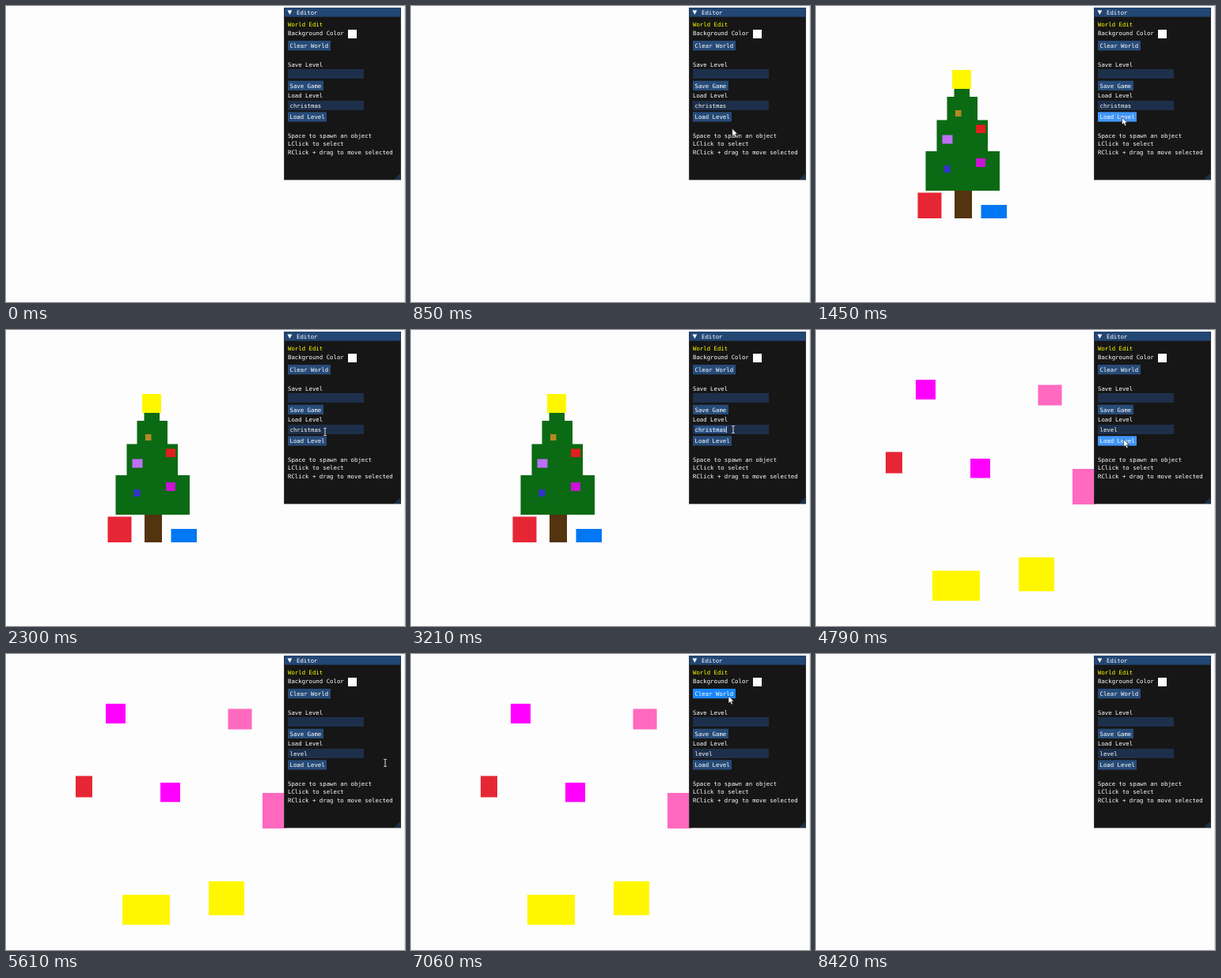
Write an HTML page with a canvas that moves like this. It is 504 by 375 pixels and loops after 8.55 s.

```html
<!DOCTYPE html>
<html lang="en">
<head>
<meta charset="utf-8">
<title>Level editor</title>
<style>
  html, body { margin: 0; width: 100%; height: 100%; overflow: hidden; background: #fdfdfd; }
  canvas { display: block; }
</style>
</head>
<body>
<canvas width="504" height="375"></canvas>
<script>
const ctx = document.querySelector('canvas').getContext('2d');
const LOOP = 8550, CHAR = 4.425;

// Boxes: left, top, right, bottom, colour
const tree = [
  [172, 81, 196, 105, '#fff700'],
  [174.5, 105, 194, 116, '#0b6a14'],
  [165.5, 115, 204, 146, '#0b6a14'],
  [152.5, 144.5, 217, 185, '#0b6a14'],
  [138.5, 184, 232, 234, '#0b6a14'],
  [175, 234, 197, 269, '#54330f'],
  [128.5, 236.5, 158.5, 269, '#e62635'],
  [208.5, 252, 241, 269, '#0077f3'],
  [176, 132, 183.5, 140, '#b38a22'],
  [202, 150.5, 214, 161, '#e21e1e'],
  [159.5, 163.5, 172.5, 174.5, '#bd70f5'],
  [202, 193, 214, 204, '#c814d4'],
  [161.5, 202, 169.5, 211, '#3333c8']
];
const blocks = [
  [126, 63, 151, 88, '#ff00ff'],
  [280.5, 69.5, 310.5, 95.5, '#ff69bf'],
  [88, 154.5, 109, 181.5, '#e62635'],
  [195, 163, 220, 187.5, '#ff00ff'],
  [324, 176, 354, 221, '#ff69bf'],
  [147, 305, 207, 343, '#fff700'],
  [256, 288, 301, 331, '#fff700']
];

// Pointer path: time, x, y
const path = [
  [60, 499, 214], [780, 412, 160], [1000, 386.5, 141], [1800, 386.5, 141],
  [2500, 407, 126], [4150, 407, 126], [4500, 388.5, 138.5], [4800, 388.5, 138.5],
  [5240, 493, 146], [5610, 479, 138], [6120, 472, 124], [6210, 472, 124],
  [6900, 401, 53], [7400, 401, 53], [7900, 448, 100], [8390, 499, 214]
];
const between = (v, a, b) => v >= a && v < b;

function pointer(t) {
  const i = path.findIndex(p => p[0] > t);
  if (i < 1) return null;
  const [t0, x0, y0] = path[i - 1], [t1, x1, y1] = path[i];
  let k = (t - t0) / (t1 - t0);
  k = k * k * (3 - 2 * k);
  return { x: x0 + (x1 - x0) * k, y: y0 + (y1 - y0) * k };
}

function box(l, t, r, b, color) {
  ctx.fillStyle = color;
  ctx.fillRect(l, t, r - l, b - t);
}

function shape(points, color) {
  ctx.beginPath();
  points.forEach(([x, y]) => ctx.lineTo(x, y));
  ctx.closePath();
  ctx.fillStyle = color;
  ctx.fill();
}

function label(text, x, midY, color = '#fff') {
  ctx.fillStyle = color;
  ctx.fillText(text, x, midY + 2.6);
}

function button(text, top, right, mouse, pressed) {
  const over = mouse && between(mouse.x, 356, right) && between(mouse.y, top, top + 12.3);
  box(356, top, right, top + 12.3, !over ? '#274b78' : pressed ? '#1886fa' : '#4296fa');
  label(text, 358.5, top + 6.2);
}

function field(text, top) {
  box(356, top, 452, top + 12, '#1d2f4a');
  label(text, 358.5, top + 6);
}

function panel(t, mouse) {
  box(351, 2, 499, 220.5, '#4a4a50');
  box(351.6, 2, 498.4, 220, '#161616');
  box(351.6, 2, 498.4, 13.7, '#234774');
  shape([[355.5, 5.6], [361.3, 5.6], [358.4, 11]], '#fff');
  shape([[498.4, 211.5], [498.4, 220], [490, 220]], '#1c3048');
  label('Editor', 367, 8);
  label('World Edit', 356, 23.5, '#ffff00');
  label('Background Color', 356, 34.3);
  box(432, 30, 443, 41, '#fdfdfd');

  const pressed = between(t, 1080, 1200) || between(t, 4560, 4650) || between(t, 7020, 7110);
  button('Clear World', 44, 410, mouse, pressed);
  label('Save Level', 356, 74);
  field('', 80);
  button('Save Game', 94.7, 401, mouse, pressed);
  label('Load Level', 356, 113.7);

  const typed = Math.floor((t - 3600) / 110) + 1;
  const name = typed > 0 ? 'level'.slice(0, typed) : 'christmas';
  const end = 358.5 + name.length * CHAR;
  field(name, 120);
  if (between(t, 2750, 3600)) {
    box(358.5, 121.5, end, 130.5, '#2b568b');
    label(name, 358.5, 126);
  }
  if (between(t, 2500, 4560)) box(end, 122, end + 0.7, 130.5, '#fff');
  button('Load Level', 134.3, 405, mouse, pressed);

  label('Space to spawn an object', 356, 164);
  label('LClick to select', 356, 174.7);
  label('RClick + drag to move selected', 356, 185.4);
}

function cursor(t, { x, y }) {
  const inField = between(x, 356, 452) && (between(y, 80, 92) || between(y, 120, 132));
  ctx.save();
  ctx.translate(x, y);
  if (inField || between(t, 5300, 6300)) {
    box(-0.5, -4.5, 0.5, 4.5, '#ddd');
    box(-2, -5, 2, -4.2, '#ddd');
    box(-2, 4.2, 2, 5, '#ddd');
  } else {
    const arrow = [[0, 0], [0, 9.6], [2.2, 7.6], [3.8, 11], [5.5, 10.2], [4, 7], [6.8, 7]];
    shape(arrow, '#fff');
    ctx.strokeStyle = '#111';
    ctx.lineWidth = 0.6;
    ctx.stroke();
  }
  ctx.restore();
}

function draw(t) {
  ctx.font = '7.35px "DejaVu Sans Mono", monospace';
  box(0, 0, 504, 375, '#fdfdfd');
  box(503, 0, 504, 375, '#dcdcdc');
  const level = between(t, 1200, 4650) ? tree : between(t, 4650, 7110) ? blocks : [];
  level.forEach(b => box(...b));
  const mouse = pointer(t);
  panel(t, mouse);
  if (mouse) cursor(t, mouse);
}

const start = performance.now();
function tick() {
  draw((performance.now() - start) % LOOP);
  requestAnimationFrame(tick);
}
tick();
</script>
</body>
</html>
```
